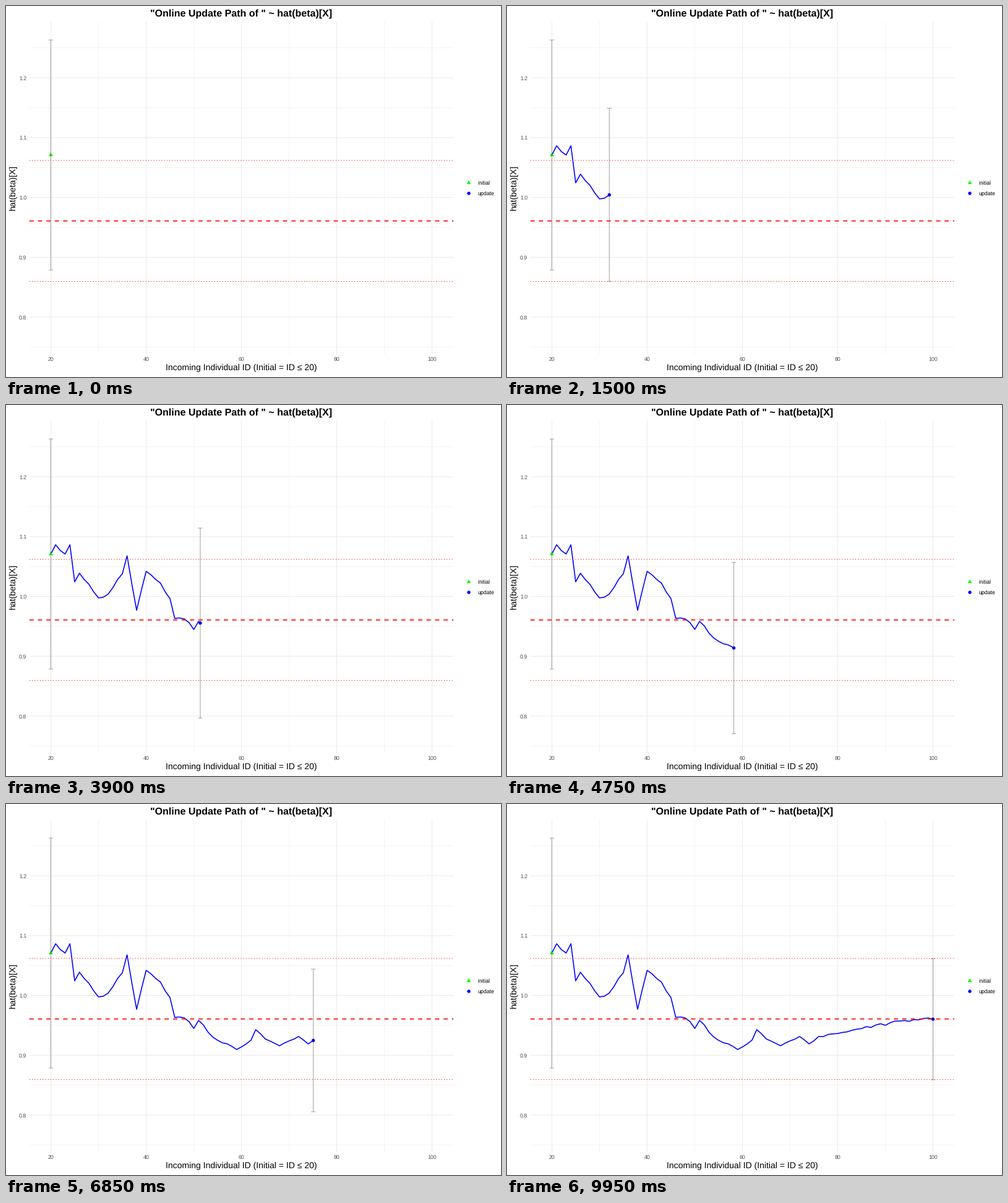
A matplotlib script for the animation above (10 s loop, 800 px wide and 600 px high).

```python
import numpy as np
import matplotlib.pyplot as plt
from matplotlib.animation import FuncAnimation
from matplotlib.patches import Circle, Polygon

W, H = 800, 600
FRAMES, INTERVAL = 200, 50
PX = 0.72  # points per pixel at 100 dpi
LEFT, RIGHT, TOP, BOTTOM = 37.9, 723, 25.5, 563
CAP = 3.47
THIN, THICK = 1.067, 1.7072
GRID, TICK = "#ebebeb", "#4d4d4d"

plt.rcParams.update({"font.family": "Liberation Sans", "text.hinting": "none"})

# Turning points of the estimate: ID, height on the stage
TURNS = [(20, 241), (21, 226), (23, 241), (24, 226), (25, 286), (26, 272),
         (30, 312), (32, 306), (35, 273), (36, 244), (38, 332), (40, 269),
         (43, 288), (45, 313), (46, 345), (48, 346), (50, 363), (51, 350),
         (54, 377), (59, 397), (62, 382), (63, 365), (65, 380), (68, 391),
         (72, 376), (74, 388), (76, 376), (93, 351), (100, 348)]
# Half-length of the error bar: ID, pixels
SPREAD = [(20, 186), (25, 176), (32, 140), (36, 139), (40, 183),
          (46, 175), (52, 151), (65, 125), (87, 104), (100, 98)]


def along(points, i):
    return np.interp(i, *zip(*points))


# Straight runs between the turns, with a slight wobble on the steps between
IDS = np.arange(20, 101)
wobble = np.random.default_rng(4).normal(0, 1.2, IDS.size)
wobble[np.isin(IDS, [i for i, _ in TURNS])] = 0
PATH = along(TURNS, IDS) + wobble


def x_at(i):
    return 72.5 + 7.7 * (i - 20)


def y_at(value):
    return 309.6 - 967.3 * (value - 1)


fig = plt.figure(figsize=(W / 100, H / 100), dpi=100, facecolor="white")
ax = fig.add_axes([0, 0, 1, 1])
ax.set_xlim(0, W)
ax.set_ylim(H, 0)
ax.axis("off")


def line(xs, ys, color, width, z, **kw):
    return ax.plot(xs, ys, color=color, lw=width * PX, zorder=z, snap=False,
                   solid_capstyle="butt", **kw)[0]


def label(x, y, s, size, color="black", ha="left", **kw):
    ax.text(x, y, s, fontsize=size * PX, color=color, ha=ha, va="baseline", **kw)


def triangle(x, y):
    ax.add_patch(Polygon([(x, y - 3.87), (x + 3.35, y + 1.93), (x - 3.35, y + 1.93)],
                         fc="lime", ec="none", zorder=4))


def dot(x, y):
    return ax.add_patch(Circle((x, y), 2.7, fc="blue", ec="none", zorder=4))


def bar_points(x, y, half):
    lo, hi, gap = y - half, y + half, np.nan
    return ([x - CAP, x + CAP, gap, x, x, gap, x - CAP, x + CAP],
            [lo, lo, gap, lo, hi, gap, hi, hi])


def error_bar(xs, ys):
    return line(xs, ys, "black", THIN, 5, alpha=0.35)


# Grid and tick labels
for i in range(20, 101, 10):
    major = i % 20 == 0
    line([x_at(i)] * 2, [TOP, BOTTOM], GRID, THIN if major else THIN / 2, 1)
    if major:
        label(x_at(i), 574, str(i), 8.8, TICK, "center")
for k in range(15, 26):
    y = y_at(k / 20)
    major = k % 2 == 0
    line([LEFT, RIGHT], [y, y], GRID, THIN if major else THIN / 2, 1)
    if major:
        label(33.2, y + 3.4, f"{k / 20:.1f}", 8.8, TICK, "right")

# Final estimate and its limits
line([LEFT, RIGHT], [347.6] * 2, "red", THICK, 6, linestyle=(0, (4, 4)))
for y in (249.7, 445.5):
    line([LEFT, RIGHT], [y, y], "red", THIN, 6, linestyle=(0, (1, 3)))

# Titles and legend
label(380.5, 17, '"Online Update Path of " ~ hat(beta)[X]', 16, ha="center", weight="bold")
label(380.5, 589, "Incoming Individual ID (Initial = ID \u2264 20)", 14, ha="center")
label(15.5, 294.3, "hat(beta)[X]", 14, ha="center", rotation=90, rotation_mode="anchor")
triangle(748, 286)
dot(748, 303)
label(762, 289, "initial", 8.8)
label(762, 306.2, "update", 8.8)

# Fixed starting estimate
triangle(x_at(20), PATH[0])
error_bar(*bar_points(x_at(20), PATH[0], SPREAD[0][1]))

# Moving parts
trail = line([], [], "blue", 1.6, 3)
head = dot(0, 0)
bar = error_bar([], [])


def update(frame):
    now = 20 + 80 * frame / (FRAMES - 1)
    x, y = x_at(now), np.interp(now, IDS, PATH)
    past = IDS < now
    trail.set_data(np.append(x_at(IDS[past]), x), np.append(PATH[past], y))
    head.center = x, y
    bar.set_data(*bar_points(x, y, along(SPREAD, now)))
    for part in (trail, head, bar):
        part.set_visible(frame > 0)
    return trail, head, bar


anim = FuncAnimation(fig, update, frames=FRAMES, interval=INTERVAL,
                     repeat=True, repeat_delay=0, blit=False)
plt.show()
```
